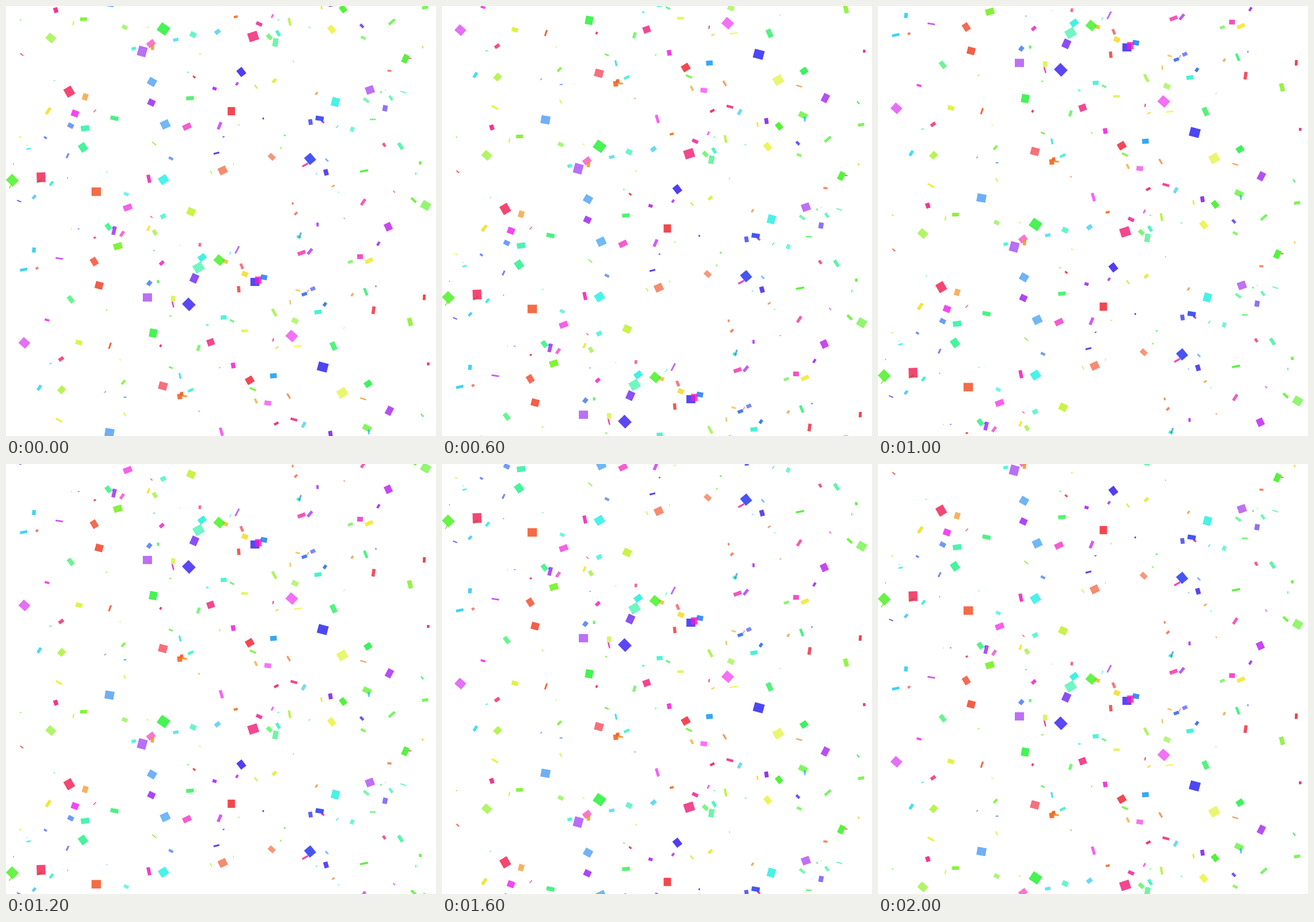
Animation, 748 px wide and 748 px high, one loop 2.2 s. Source, as an HTML page:

```html
<!DOCTYPE html>
<html lang="en">
<head>
<meta charset="utf-8">
<title>Confetti</title>
<style>
  html, body { margin: 0; width: 100%; height: 100%; overflow: hidden; background: #fff; }
  svg { display: block; width: 100%; height: 100%; }
</style>
</head>
<body>
<svg viewBox="0 0 748 748">
  <g id="fall">
    <g id="sheet"></g>
    <use href="#sheet" y="-748"/>
  </g>
</svg>
<script>
const SIZE = 748, STEPS = 11, STEP_MS = 200;
const fall = document.getElementById('fall');
const sheet = document.getElementById('sheet');

// Large pieces, biggest first: x, y, angle, hue
const vivid = [
  [274, 40, 35, 125], [318, 519, 45, 247], [551, 628, 15, 242], [430, 53, -18, 335],
  [61, 298, 88, 345], [11, 303, 45, 108], [157, 323, 0, 13], [110, 149, 60, 345],
  [529, 266, 50, 235], [433, 480, 0, 246], [371, 442, 40, 110], [274, 302, -32, 177],
  [573, 167, 105, 175], [256, 569, 100, 125], [392, 183, 90, 357], [134, 246, 55, 150],
  [322, 358, 25, 75], [162, 486, 15, 8], [424, 651, -30, 355], [665, 384, 65, 285],
  [439, 477, 90, 310], [356, 585, -20, 335], [120, 187, 20, 300], [253, 168, 25, 275]
];
const pale = [
  [237, 79, 105, 272], [335, 455, -30, 157], [497, 574, 42, 299], [585, 673, -30, 66],
  [246, 507, 0, 274], [180, 742, 10, 212], [32, 586, 42, 292], [730, 347, 30, 105],
  [277, 206, -25, 208], [273, 661, 15, 355], [633, 146, -20, 275], [377, 286, -25, 12],
  [254, 132, 30, 210]
];

let seed = 20;
function rand(min = 0, max = 1) {
  seed = (seed * 16807) % 2147483647;
  return min + (max - min) * seed / 2147483647;
}

function piece(x, y, angle, hue, w, h, alpha) {
  const rect = document.createElementNS('http://www.w3.org/2000/svg', 'rect');
  const attrs = {
    x: -w / 2, y: -h / 2, width: w, height: h,
    fill: `hsl(${hue}, 88%, 52%)`, 'fill-opacity': alpha,
    transform: `translate(${x} ${y}) rotate(${angle})`
  };
  for (const name in attrs) rect.setAttribute(name, attrs[name]);
  sheet.append(rect);
}

function large(list, from, to, alpha) {
  list.forEach(([x, y, angle, hue], i) => {
    const w = from + (to - from) * i / (list.length - 1);
    piece(x, y, angle, hue, w, w * 0.9, alpha);
  });
}

function scatter(count) {
  for (let i = 0; i < count; i++) {
    const w = rand(2, 15);
    const h = w * rand(0.2, 0.85);
    piece(rand(0, SIZE), rand(0, SIZE), rand(-90, 90), rand(0, 360), w, h, rand(0.58, 0.88));
  }
}

function draw(ms) {
  const step = Math.floor(ms / STEP_MS) % STEPS;
  fall.setAttribute('transform', `translate(0 ${step * SIZE / STEPS})`);
}

scatter(225);
large(pale, 17, 14, 0.62);
large(vivid, 18, 12, 0.8);
draw(0);

const start = performance.now();
function tick() {
  draw(performance.now() - start);
  requestAnimationFrame(tick);
}
requestAnimationFrame(tick);
</script>
</body>
</html>
```
